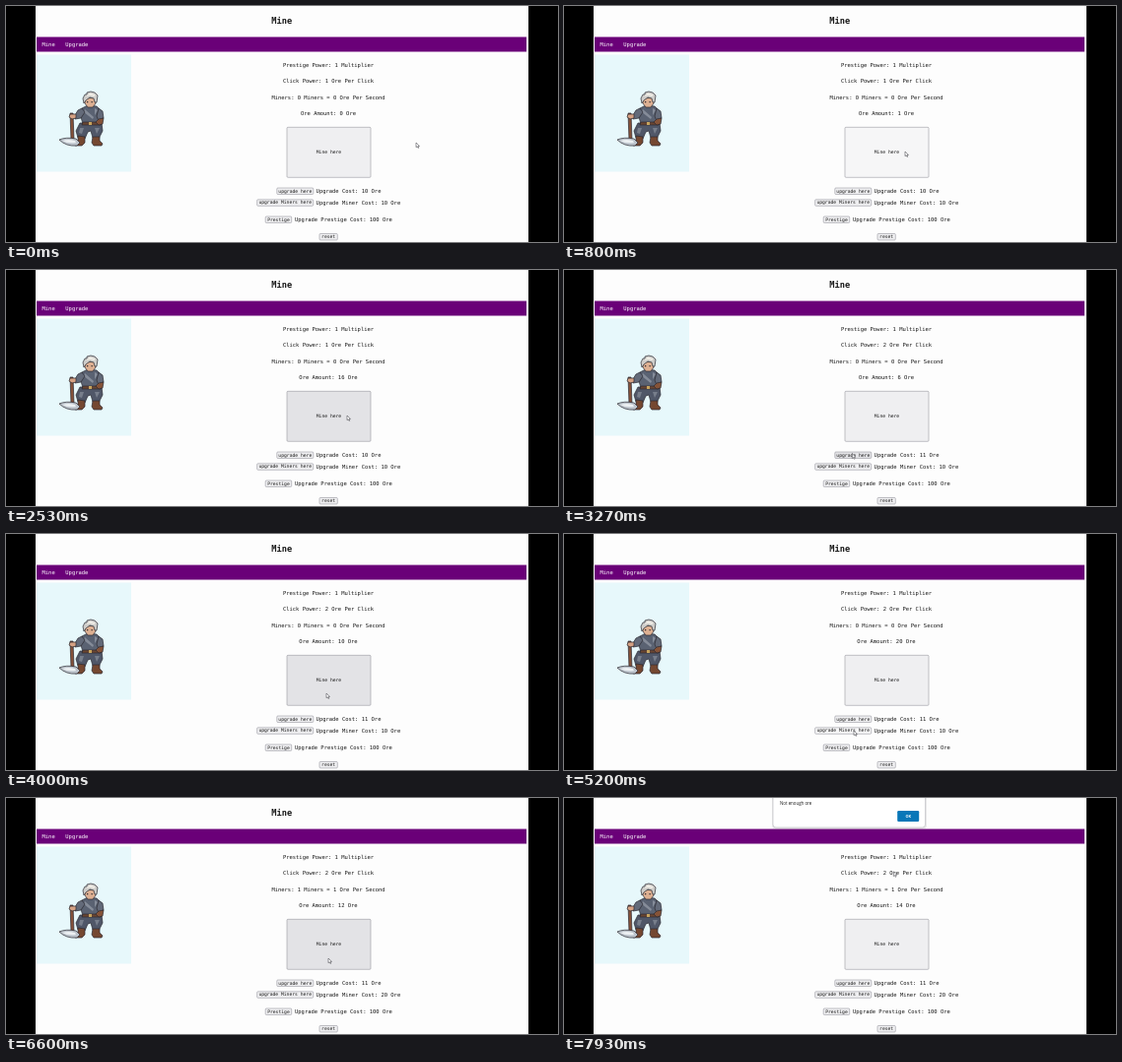
Write an HTML page that moves like this. It is 560 by 240 pixels and loops after 8000 ms.

```html
<!DOCTYPE html>
<html lang="en">
<head>
<meta charset="utf-8">
<title>Mine</title>
<style>
  html, body { margin: 0; width: 100%; height: 100%; overflow: hidden; background: #000; }
  svg { display: block; width: 560px; height: 240px; }
  text { font: 5.48px "DejaVu Sans Mono", monospace; fill: #181818; white-space: pre; }
  .mid { text-anchor: middle; }
  .title { font-size: 8.7px; font-weight: bold; }
  .nav { fill: #fff; }
  .button text { font-size: 4.7px; text-anchor: middle; }
  .button rect { fill: #efeff1; stroke: #85858f; stroke-width: .5; }
  .button.hover rect { fill: #e3e3e6; }
  .button.press rect { fill: #f6f6f7; }
  .miner { stroke: #2b2a31; stroke-width: .7; stroke-linejoin: round; }
  .detail { stroke: none; }
  .dialog text { font: 4.4px "Open Sans", sans-serif; }
  .dialog .ok { font-size: 3.8px; font-weight: bold; fill: #fff; }
</style>
</head>
<body>
<svg viewBox="0 0 560 240">
  <rect width="560" height="240"/>
  <rect x="30" width="500" height="240" fill="#fdfdfd"/>
  <text class="mid title" x="279.7" y="18">Mine</text>
  <rect x="31" y="31.5" width="497" height="15" fill="#6a0078"/>
  <text class="nav" x="36.5" y="41">Mine</text>
  <text class="nav" x="60.3" y="41">Upgrade</text>

  <rect x="31" y="49.5" width="96" height="119" fill="#e7f8fb"/>
  <g class="miner">
    <!-- legs and boots -->
    <path fill="#505768" d="M75 119 L97 119 L98 127 L94 135 L88 134 L86 127 L83 128 L80 135 L73 134 L71 127Z"/>
    <path fill="#754831" d="M73 132 L80 133 L80 139 L77 142 L70 142 L69 140 L73 137Z"/>
    <path fill="#754831" d="M88 133 L95 133 L95 137 L98 140 L97 142 L89 142 L87 139Z"/>
    <!-- torso and belt -->
    <path fill="#5a6272" d="M77 104 L83 101 L92 102 L96 106 L94 120 L78 120 L76 113Z"/>
    <path fill="#684532" d="M78 118 L95 118 L96 121 L77 121Z"/>
    <path class="detail" fill="#c6a45e" d="M84 118 h3 v3 h-3Z"/>
    <path class="detail" fill="#858c99" d="M80 105 L89 113 L88 115 L79 108Z M90 104 L93 106 L90 111Z"/>
    <path class="detail" fill="#777e8b" d="M75 124 L79 124 L77 130 L74 129Z M90 124 L95 124 L92 130Z"/>
    <!-- pickaxe -->
    <path fill="#855139" d="M65 109 L68 109 L69 136 L66 136Z"/>
    <path fill="#bdc4cc" d="M54 136 Q61 133 71 135 L75 139 L72 142 Q61 143 54 136Z"/>
    <path class="detail" fill="#edf1f3" d="M57 137 Q64 135 70 137 L71 139 Q63 140 57 137Z"/>
    <!-- arms -->
    <path fill="#636a79" d="M77 104 L80 108 L76 114 L70 115 L70 111 L73 106Z"/>
    <path fill="#d6a284" d="M71 110 L71 114 L67 115 L64 113 L65 110Z"/>
    <path fill="#636a79" d="M94 104 L98 107 L99 114 L94 117 L92 112Z"/>
    <path fill="#855338" d="M94 115 L99 114 L98 120 L94 121 L91 118Z"/>
    <!-- head -->
    <path fill="#deb092" d="M80 94 L91 93 L91 99 L88 103 L83 103 L80 99Z"/>
    <path fill="#cecdca" d="M79 99 L78 94 L80 90 L82 90 L82 88 L86 87 L90 88 L93 91 L92 98 L90 98 L89 94 L85 93 L81 96Z"/>
    <path class="detail" fill="#f1eee7" d="M81 92 L85 88.5 L90 90 L90 92 L85 91Z"/>
    <path class="detail" fill="#342d30" d="M82 97 h1.3 v1.3 h-1.3Z M86.5 97 h1.3 v1.3 h-1.3Z"/>
  </g>

  <text class="mid" x="327" y="62">Prestige Power: 1 Multiplier</text>
  <text class="mid" x="327" y="78" id="power"></text>
  <text class="mid" x="327" y="94.5" id="miners"></text>
  <text class="mid" x="327" y="111" id="ore"></text>
  <text x="314.6" y="189.7" id="clickCost"></text>
  <text x="314.6" y="201.5" id="minerCost"></text>
  <text x="293" y="218.7">Upgrade Prestige Cost: 100 Ore</text>
  <g id="buttons"></g>

  <g class="dialog" id="dialog">
    <rect x="211" y="-12" width="157" height="43.5" rx="4" fill="#888" opacity=".18"/>
    <rect x="212" y="-12" width="154.5" height="42" rx="3" fill="#fff" stroke="#b5b5bd" stroke-width=".6"/>
    <text x="219" y="6.7">Not enough ore</text>
    <rect x="338.2" y="13" width="22" height="11" rx="1.2" fill="#0877b8"/>
    <text class="mid ok" x="349.2" y="20">OK</text>
  </g>
  <path id="cursor" d="M0 0 L0 4.7 L1.1 3.8 L2 5.5 L2.8 5.1 L2 3.5 L3.5 3.4Z" fill="#fff" stroke="#45454a" stroke-width=".55"/>
</svg>
<script>
  const LOOP = 8000, FRAME = LOOP / 120;
  const POWER_BOUGHT = 3170, MINER_BOUGHT = 5270, REFUSED = 7330;
  const $ = id => document.getElementById(id);

  const buttons = [
    ["Mine here", 285, 123.3, 85, 51],
    ["upgrade here", 274.8, 185, 37, 6.5],
    ["upgrade Miners here", 254.7, 196.8, 57, 6.5],
    ["Prestige", 263.2, 214, 26.5, 6.5],
    ["reset", 318, 231.5, 18.3, 6.5]
  ].map(([label, x, y, w, h]) => {
    $("buttons").insertAdjacentHTML("beforeend",
      `<g class="button"><rect x="${x}" y="${y}" width="${w}" height="${h}" rx="1"/>` +
      `<text x="${x + w / 2}" y="${y + h / 2 + 1.3}">${label}</text></g>`);
    return { x, y, w, h, node: $("buttons").lastChild };
  });

  // Pointer stops: time, x, y
  const path = [
    [0, 416, 139], [180, 416, 139], [560, 346, 148], [2600, 346, 148],
    [3030, 292, 187], [3240, 292, 187], [3690, 325, 162], [4620, 325, 162],
    [5060, 294, 200], [5380, 294, 200], [5950, 327, 163], [6800, 327, 163],
    [7180, 304, 200], [7500, 304, 200], [8190, 348, 18]
  ];

  const bursts = [
    { start: 597, every: 118, count: 16, gain: 1 },
    { start: 3729, every: 118, count: 7, gain: 2 },
    { start: 6340, every: 200, count: 2, gain: 2 }
  ];

  function pointerAt(t) {
    const i = path.findIndex(stop => stop[0] > t);
    const [t0, x0, y0] = path[i - 1], [t1, x1, y1] = path[i];
    const u = (t - t0) / (t1 - t0), ease = u * u * (3 - 2 * u);
    return [x0 + (x1 - x0) * ease, y0 + (y1 - y0) * ease];
  }

  function setText(id, value) {
    if ($(id).textContent !== value) $(id).textContent = value;
  }

  function render(t) {
    const powered = t >= POWER_BOUGHT, hired = t >= MINER_BOUGHT ? 1 : 0, refused = t >= REFUSED;
    let ore = -10 * powered - 10 * hired;
    let pressed = [POWER_BOUGHT, MINER_BOUGHT, REFUSED].some(at => t >= at - 110 && t < at);
    for (const { start, every, count, gain } of bursts) {
      const beat = (t - start) / every;
      ore += gain * Math.max(0, Math.min(count, Math.floor(beat)));
      if (beat >= 0 && beat < count && beat % 1 >= .45) pressed = true;
    }
    setText("power", `Click Power: ${powered ? 2 : 1} Ore Per Click`);
    setText("miners", `Miners: ${hired} Miners = ${hired} Ore Per Second`);
    setText("ore", `Ore Amount: ${ore} Ore`);
    setText("clickCost", `Upgrade Cost: ${powered ? 11 : 10} Ore`);
    setText("minerCost", `Upgrade Miner Cost: ${hired ? 20 : 10} Ore`);

    const [x, y] = pointerAt(t);
    for (const b of buttons) {
      const over = !refused && x >= b.x && x <= b.x + b.w && y >= b.y && y <= b.y + b.h;
      b.node.classList.toggle("hover", over);
      b.node.classList.toggle("press", over && pressed);
    }
    $("cursor").setAttribute("transform", `translate(${x} ${y})`);
    $("dialog").style.display = refused ? "" : "none";
  }

  const origin = performance.now();
  function tick() {
    const t = (performance.now() - origin) % LOOP;
    render(Math.min(119, Math.floor((t + 5) / FRAME)) * FRAME);
    requestAnimationFrame(tick);
  }
  tick();
</script>
</body>
</html>
```
